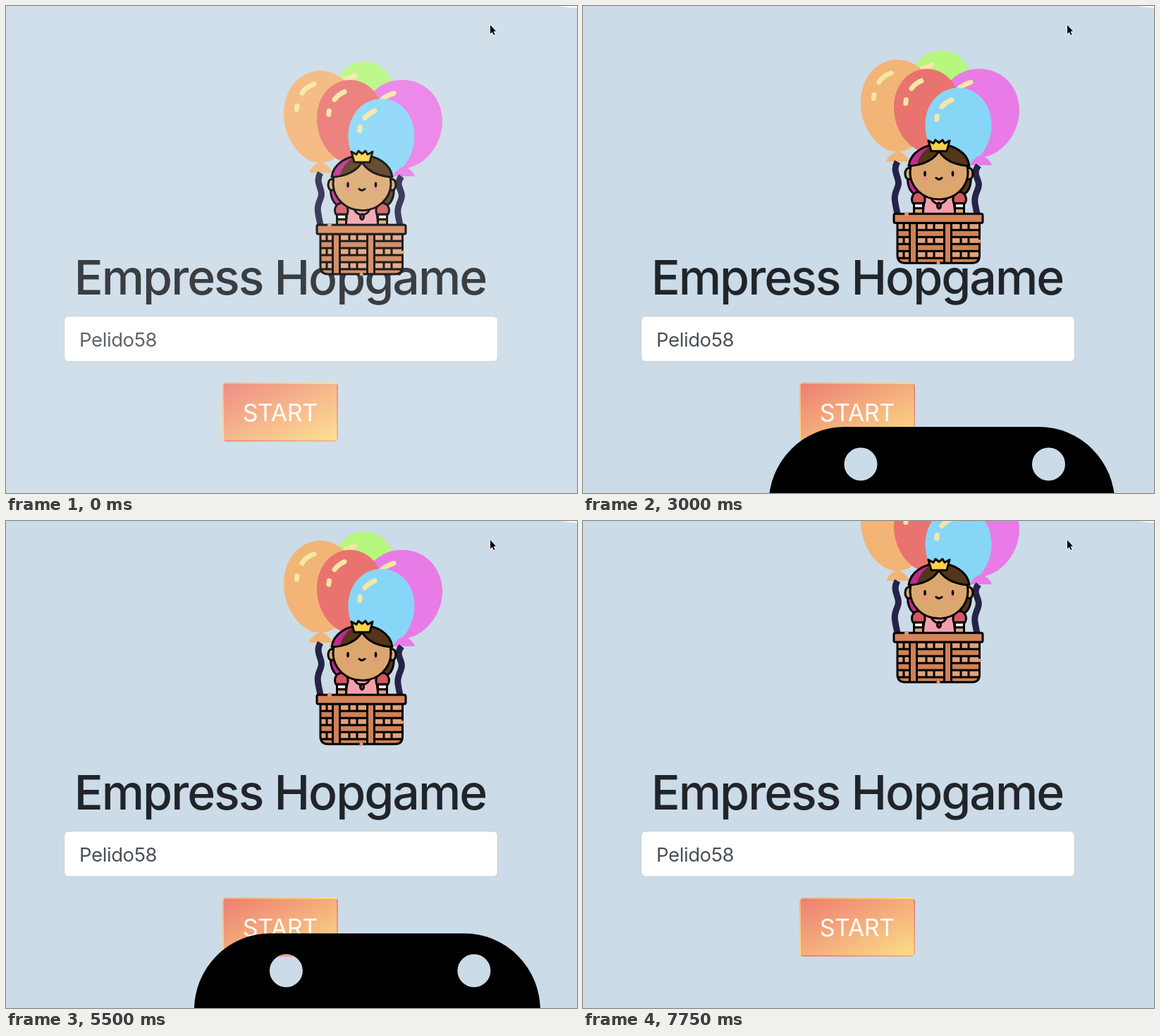
An HTML page that plays this animation: 810x692 px, repeating every 8000 ms.

```html
<!DOCTYPE html>
<html lang="en">
<head>
<meta charset="utf-8">
<title>Empress Hopgame</title>
<style>
  html, body { margin: 0; width: 810px; height: 692px; overflow: hidden; background: #cbdbe7; }
  svg { position: absolute; left: 0; top: 0; display: block; }
  text { font-family: Inter, Roboto, sans-serif; }
  .start {
    position: absolute; left: 307px; top: 535px; width: 164px; height: 84px;
    box-sizing: border-box; border: 2px solid transparent; border-radius: 6px;
    background: linear-gradient(to bottom right, #ed7f73, #fcdc86);
  }
  .ink { stroke: #000; stroke-width: 3; stroke-linejoin: round; stroke-linecap: round; }
  .line { fill: none; }
  .shine { fill: none; stroke: #f4e7a4; stroke-width: 7; stroke-linecap: round; }
  .rope { fill: none; stroke: #252347; stroke-width: 9; }
</style>
</head>
<body>
<div class="start"></div>
<svg width="810" height="692" viewBox="0 0 810 692">
  <ellipse id="cloud" cx="812" cy="-120" rx="123" ry="123" fill="#f4f6f7"/>

  <text x="389" y="410" text-anchor="middle" font-size="68" font-weight="500" letter-spacing="-2" fill="#212529">Empress Hopgame</text>
  <rect x="82.5" y="440.8" width="615" height="64.5" rx="6" fill="#fff" stroke="#ced4da" stroke-width="1.5"/>
  <text x="104" y="484" font-size="27.5" letter-spacing="-.4" fill="#495057">Pelido58</text>
  <text x="388.8" y="590" text-anchor="middle" font-size="34" letter-spacing="-.4" fill="#fff">START</text>

  <g id="rider">
    <g id="balloons"></g>
    <path fill="#f2b576" d="M446.500 222C439 224 432 230 430 237H463C461 230 454 224 446.500 222Z"/>
    <path fill="#e97be6" d="M564.500 228C557 230 551 236 549 242H580C578 236 572 230 564.500 228Z"/>
    <path class="rope" d="M446 237C437 253 452 260 446 274S442 291 446 311"/>
    <path class="rope" d="M561 242C550 257 566 262 560 276S555 293 559 311"/>

    <!-- hair behind the face -->
    <path class="ink" fill="#523619" d="M505 252H549C552 266 549 278 541 283L530 289H505Z"/>
    <path class="ink" fill="#c22a92" d="M505 252H461C459 266 462 278 470 283L480 289H505Z"/>

    <!-- dress and arms -->
    <path class="ink" fill="#f3a0ac" d="M482 312L485 284H525L528 312Z"/>
    <path class="ink line" d="M494 289Q497 296 505 297Q513 296 516 289"/>
    <g id="arm">
      <rect class="ink" x="469.500" y="303" width="13" height="9" fill="#dba76f"/>
      <rect class="ink" x="469.500" y="296" width="13" height="7" fill="#fff"/>
      <path class="ink" fill="#d4585e" d="M468 296C464 288 469 280 476 280S487 288 484 296Z"/>
    </g>
    <use href="#arm" transform="translate(1010 0) scale(-1 1)"/>
    <ellipse class="ink" cx="505" cy="299.500" rx="2.500" ry="4" fill="#a8323c"/>

    <!-- head -->
    <ellipse class="ink" cx="462" cy="254" rx="5" ry="8" fill="#dba76f"/>
    <ellipse class="ink" cx="548" cy="254" rx="5" ry="8" fill="#dba76f"/>
    <ellipse class="ink" cx="505" cy="252" rx="41" ry="38.500" fill="#dba76f"/>
    <path class="ink" fill="#523619" d="M505 222C497 235 482 242 462 243C464 224 484 212.500 505 212.500S546 224 548 243C528 242 513 235 505 222Z"/>
    <path fill="#c22a92" d="M491 216C476 220 466 230 464 241.500L474 240.500Q477 226 491 216Z"/>
    <path class="ink" fill="#fbd248" d="M490 207L497 211L500 206L505 210L510 206L513 211L520 207L516 222H494Z"/>
    <ellipse cx="485" cy="254" rx="1.800" ry="4"/>
    <ellipse cx="524.500" cy="254" rx="1.800" ry="4"/>
    <ellipse cx="485" cy="261.500" rx="5" ry="2.500" fill="#ef8f8b"/>
    <ellipse cx="525" cy="261.500" rx="5" ry="2.500" fill="#ef8f8b"/>
    <path class="ink line" d="M501 260q4 4 8 0"/>

    <!-- basket -->
    <path fill="#d08256" d="M446 324H563V370Q563 381 552 381H457Q446 381 446 370Z"/>
    <g id="weave"></g>
    <path class="ink line" d="M446 324H562.500V370Q562.500 381 552 381H457Q446 381 446 370Z"/>
    <rect class="ink" x="441" y="311" width="126" height="13" rx="2" fill="#d4855a"/>
    <g fill="#dc9a75">
      <circle cx="459" cy="311" r="3"/>
      <circle cx="562.500" cy="350" r="2.500"/>
      <circle cx="504" cy="381" r="2.500"/>
    </g>
  </g>

  <!-- drawn with its top edge at y = 0 -->
  <path id="monster" fill-rule="evenodd" d="
    M286 109A108 109 0 0 1 394 0H669A108 109 0 0 1 777 109V300H286Z
    M393 53a23.500 23.500 0 1 0 47 0a23.500 23.500 0 1 0-47 0Z
    M659.500 53a23.500 23.500 0 1 0 47 0a23.500 23.500 0 1 0-47 0Z
    M393 300V138Q393 127 399 121L425 173L444 210L459 210L485 173L526 115H557L576 173L588 210L599 210L624 173L657 115H684L698 173L706 205L713 205L722 173L732 142V300Z"/>

  <rect id="veil" width="810" height="692" fill="#fff"/>
  <path d="M687 27V39.500L689.800 36.900L691.900 41.300L693.600 40.500L691.600 36.200L695 35.800Z" fill="#000" stroke="#fff" stroke-width="1.400" paint-order="stroke"/>
</svg>
<script>
const LOOP = 8000, STEP = 250;
const el = id => document.getElementById(id);

// [time, offset] pairs
const RISE = [[0, 0], [1750, -5.7], [3000, -15.7], [4500, -39.3], [5500, -64], [6750, -110.5], [7750, -152], [8000, -162]];
const PEEK = [[2500, 702], [2750, 645], [3000, 598], [3750, 532], [4250, 516], [4500, 519], [5500, 586], [6250, 690], [6500, 730]];

// centre x, top, half width, height, colour, shine start, shine end, dot
const BALLOONS = [
  [508, 79, 46, 120, '#b6f77d', [482, 104], [495, 99]],
  [562, 105, 57, 126, '#e97be6', [534, 132], [550, 124]],
  [446, 92, 52, 131, '#f2b576', [420, 124], [437, 111], [412.5, 145]],
  [488, 105, 47, 118, '#e9736f', [466, 133], [480, 122], [458, 152]],
  [532.5, 132, 47, 113, '#87d6f8', [509, 159], [523, 149], [502, 175]]
];

function balloon([x, top, r, h, color, a, b, dot]) {
  const mid = top + h * .47, end = top + h;
  const half = s => `C${x + s * r * .57} ${top} ${x + s * r} ${top + h * .2} ${x + s * r} ${mid}` +
    `C${x + s * r} ${mid + h * .28} ${x + s * r * .5} ${end} ${x} ${end}`;
  const spot = dot ? `<path class="shine" d="M${dot[0] + .4} ${dot[1] - 3}l-.6 5"/>` : '';
  return `<path fill="${color}" d="M${x} ${top}${half(1)}M${x} ${top}${half(-1)}"/>` +
    `<path class="shine" d="M${a}Q${a[0] + 5} ${b[1] + 4} ${b}"/>` + spot;
}

function weave() {
  const rows = [325, 334, 344, 354, 364, 374];
  const panels = [[447, 463, [455]], [474, 512, [487, 498]], [523, 562, [536, 547]]];
  const box = (x, y, w, h, color) => `<rect x="${x}" y="${y}" width="${w}" height="${h}" fill="${color}"/>`;
  let out = '';
  for (const [l, r, posts] of panels) {
    rows.forEach((y, i) => {
      if (i % 2 === 0) {
        out += box(l, y, r - l, 8, '#e0a27d');
        for (const x of posts) out += box(x - 1.5, y, 3, 9, '#000');
      }
      if (i) out += box(l, y - 1.5, r - l, 3, '#000');
    });
  }
  for (const x of [462, 472, 511, 521]) out += box(x, 324, 3, 57, '#000');
  return out;
}

// smooth curve through the pairs
function along(keys, t) {
  const n = keys.length - 1;
  if (t <= keys[0][0]) return keys[0][1];
  if (t >= keys[n][0]) return keys[n][1];
  const i = keys.findIndex(k => k[0] > t) - 1;
  const slope = j => {
    const a = keys[Math.max(j - 1, 0)], b = keys[Math.min(j + 1, n)];
    return (b[1] - a[1]) / (b[0] - a[0]);
  };
  const [t0, v0] = keys[i], [t1, v1] = keys[i + 1], d = t1 - t0, u = (t - t0) / d;
  const w = u * u * (3 - 2 * u);
  return v0 + (v1 - v0) * w + d * u * (1 - u) * (slope(i) * (1 - u) - slope(i + 1) * u);
}

el('balloons').innerHTML = BALLOONS.map(balloon).join('');
el('weave').innerHTML = weave();

const rider = el('rider'), monster = el('monster'), veil = el('veil'), cloud = el('cloud');
const move = (node, x, y) => node.setAttribute('transform', `translate(${x.toFixed(2)} ${y.toFixed(2)})`);

function draw(now) {
  const t = Math.floor(now % LOOP / STEP) * STEP;
  const top = along(PEEK, t);
  move(rider, 0, along(RISE, t));
  move(monster, (519 - top) * .285, top);
  move(cloud, t / 2000, 0);
  veil.setAttribute('opacity', Math.max(0, .115 * (1 - t / 750)));
}

const begin = performance.now();
function tick() {
  draw(performance.now() - begin);
  requestAnimationFrame(tick);
}
draw(0);
tick();
</script>
</body>
</html>
```
